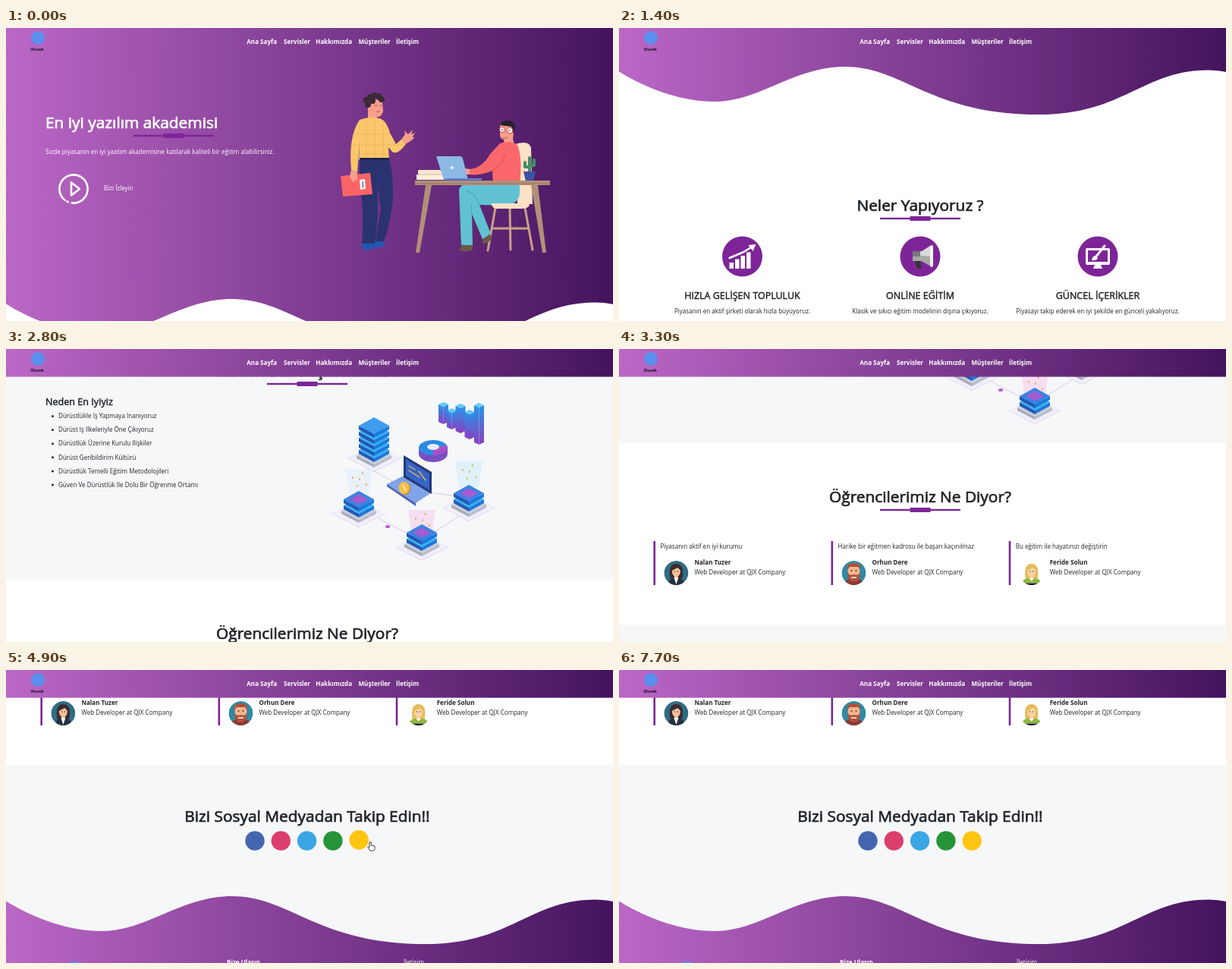
These frames come from a looping animation (800 by 386 pixels, 8.1 s). An HTML page:

```html
<!DOCTYPE html>
<html lang="tr">
<head>
<meta charset="utf-8">
<style>
  html, body { margin: 0; width: 100%; height: 100%; overflow: hidden; background: #fff; }
  svg { display: block; width: 100%; height: 100%; }
  text { font-family: "Open Sans", "Noto Sans", sans-serif; white-space: pre; }
  .medium { stroke: currentColor; stroke-width: .035em; }
</style>
</head>
<body>
<svg id="stage" viewBox="0 0 800 386"></svg>
<script>
const LOOP = 8100, STEP = 100;
const PURPLE = '#7d2598', INK = '#212529';
const WAVE = '0,363.5 C40,388 85,403 126,403 C185,403 230,357 298,357 ' +
  'C375,357 410,420 553,420 C665,420 690,361.5 776,361.5 Q790,361.5 800,364';

// Shape helpers; text is placed by its vertical centre
const text = (x, y, str, size = 8.07, fill = INK, weight = 400, anchor = 'start') =>
  `<text x="${x}" y="${y + size * .36}" font-size="${size}" fill="${fill}" color="${fill}" text-anchor="${anchor}" ` +
  (weight == 500 ? 'class="medium"' : `font-weight="${weight}"`) + `>${str}</text>`;
const middle = (x, y, str, size, weight = 400, fill = INK) => text(x, y, str, size, fill, weight, 'middle');
const rect = (x, y, w, h, fill, rx = 0) => `<rect x="${x}" y="${y}" width="${w}" height="${h}" fill="${fill}" rx="${rx}"/>`;
const disc = (x, y, r, fill, ry = r) => `<ellipse cx="${x}" cy="${y}" rx="${r}" ry="${ry}" fill="${fill}"/>`;
const shape = (d, fill) => `<path d="${d}" fill="${fill}"/>`;
const line = (d, color, width = 1) =>
  `<path d="${d}" fill="none" stroke="${color}" stroke-width="${width}" stroke-linecap="round" stroke-linejoin="round"/>`;
const at = (x, y, content) => `<g transform="translate(${x} ${y})">${content}</g>`;
const rule = (x, y) => rect(x - 53, y - 1.2, 106, 2.4, PURPLE) + rect(x - 13.5, y - 3, 27, 6, PURPLE);
const heading = (y, str) => middle(397, y, str, 20.85, 500);

const standingMan =
  shape('M469,283 l17,-2 l1,8 q-6,4 -18,3z M486,280 l10,-1 l4,6 q-4,5 -14,4z', '#2456b0') +
  shape('M466,172 H505 Q511,195 510,225 Q506,260 498,281 H487 L494,238 L489,203 Q492,250 486,284 H469 Q473,245 466,205z', '#2a3270') +
  shape('M477,98 Q488,91 496,98 L497,110 Q494,118 489,117 V123 H477z', '#f79f8a') +
  [[475, 95], [477, 101], [480, 91], [486, 89], [492, 90], [495, 94], [483, 96]].map(([x, y]) => disc(x, y, 4, '#3a2a35')).join('') +
  line('M486,102 h3 M493,102 h2 M488,110 q3,2 5,-1', '#a13f48', .8) +
  shape('M466,121 Q478,116 492,119 Q501,121 506,138 L514,153 L522,146 L527,153 Q516,168 509,163 L504,157 L505,174 H465 L466,151 L463,190 L455,187 Q451,143 466,121z', '#fbc76c') +
  line('M457,140 H506 M456,154 H524 M466,166 H505 M475,121 V173 M486,119 V173 M497,122 V173 M457,174 H464', '#e3ab50', .6) +
  rect(466, 171, 39, 3, '#1f2550') +
  shape('M521,147 L526,140 L525,135 L530,140 L536,134 L534,140 L539,138 L536,143 L538,145 L533,149 L526,153z', '#f79f8a') +
  shape('M441,195 L480,191 L483,219 L444,222z', '#fb6467') +
  shape('M466,200 l7,-1 l1,13 l-7,1z', '#fff') + line('M470,202 l.6,8', '#333', 1) +
  shape('M455,187 l8,3 l0,9 l-6,4 l-4,-7z', '#f79f8a');

const deskMan =
  shape('M671,153 Q690,147 692,158 L694,232 H674z', '#fae1c6') +
  line('M645,237 L635,293 M684,237 L694,292 M664,238 L665,292 M643,264 H688', '#c7a184', 3) +
  shape('M602,284 l13,1 l0,7 q-6,4 -18,1z M628,275 l9,-5 l4,6 q-5,8 -13,8z', '#6a5a48') +
  shape('M597,213 Q600,203 620,204 H676 Q682,230 660,234 L624,233 L639,271 L628,278 L614,245 L615,286 H600z', '#60c2d2') +
  line('M606,215 q14,1 17,18 M614,245 L613,232', '#3a9fb8', .8) +
  shape('M640,231 H689 Q692,237 680,238 H646 Q640,237 640,231z', '#fae1c6') +
  shape('M651,128 Q660,122 670,129 L668,146 L670,154 H657 L656,147 Q651,146 651,140z', '#f79f8a') +
  shape('M651,128 Q653,121 661,122 Q671,121 671,132 L668,139 L666,130z', '#272230') +
  `<g fill="#fbe3dd" stroke="#c92c42" stroke-width=".8"><circle cx="654" cy="134" r="3.7"/><circle cx="664" cy="135" r="4"/></g>` +
  disc(654, 134, .8, '#333') + disc(663, 135, .8, '#333') + line('M654,145 q4,2 7,-1', '#a13f48', .8) +
  shape('M651,152 Q664,147 674,154 Q681,170 677,207 H642 L641,188 Q625,195 611,193 L612,186 Q629,183 638,166z', '#fa686c') +
  line('M658,168 Q652,183 641,188', '#cf4757', .8) +
  shape('M612,186 L599,184 L594,188 L600,193 L611,193z', '#f79f8a') +
  rect(543, 187, 37, 6, '#f6e6d0', 1) + rect(541, 193, 40, 7, '#fbeeda', 1) + line('M543,193 H580', '#c9a992', .7) +
  shape('M567,169 H598 Q601,169 602,172 L609,200 H577z', '#8cb9e4') + disc(588, 184, 2, '#e9f4ff') +
  rect(578, 198, 49, 2.5, '#5d88cf', 1) +
  line('M690,190 V171 M690,183 h-6 v-6 M690,181 h6 v-7', '#3f8e63', 4) +
  shape('M682,189 H698 L695,202 H685z', '#3c50a4') +
  shape('M553,207 H561 L545,296 H540z M692,207 H701 L712,296 H707z', '#b28f78') +
  rect(539, 201, 178, 6, '#b28f78') + line('M540,205 H716', '#8e6e60', .7);

const hero =
  rect(0, 0, 800, 440, 'url(#violet)') +
  text(52, 124, 'En iyi yazılım akademisi', 20.85, '#fff', 500) + rule(221, 142) +
  text(52, 163, 'Sizde piyasanın en iyi yazılım akademisine katılarak kaliteli bir eğitim alabilirsiniz.', 8.07, '#fff') +
  `<circle cx="89" cy="212" r="18.6" fill="none" stroke="#fff" stroke-width="2.6" stroke-dasharray="108 3 4 2" transform="rotate(125 89 212)"/>` +
  line('M86,203.5 V220.5 L97,212z', '#fff', 2.6) +
  text(129, 211, 'Bizi İzleyin', 8.07, '#fff') +
  standingMan + deskMan +
  shape(`M${WAVE} V445 H0z`, '#fff');

const growth = [0, 1, 2, 3].map(i => rect(-17 + i * 7.5, 8 - i * 4.5, 5.5, 8 + i * 4.5, '#fff')).join('') +
  line('M-17,2 L2,-6 L13,-13', '#fff', 2.5) + shape('M8,-15 L18,-16 L14,-7z', '#fff');
const megaphone = shape('M-10,-7 H2 L13,-14 V12 L2,6 H-10z', '#d9d9d9') + shape('M-10,-1 H2 L13,0 V12 L2,6 H-10z', '#a8a8a8') +
  rect(-10, -7, 10, 7, '#777') + rect(13, -15, 4, 29, '#f4f4f4', 2) + shape('M-7,6 h7 l2,10 h-6z', '#333');
const monitor = rect(-16, -11, 32, 22, '#fff', 2) + rect(-13, -8, 26, 15, PURPLE) +
  shape('M-4,11 H4 L6,16 H-6z', '#fff') + line('M-3,1 L9,-14', '#fff', 3) + shape('M-8,5 Q-7,-1 -3,-1 L0,2 Q-2,6 -8,5z', '#fff');
const service = (x, icon, title, info) =>
  at(x, 607, disc(0, 0, 26.5, PURPLE) + icon) + middle(x, 658, title, 12.5, 500) + middle(x, 679, info, 8.07);

const services = heading(539, 'Neler Yapıyoruz ?') + rule(397, 557) +
  service(162.5, growth, 'HIZLA GELİŞEN TOPLULUK', 'Piyasanın en aktif şirketi olarak hızla büyüyoruz.') +
  service(397, megaphone, 'ONLİNE EĞİTİM', 'Klasik ve sıkıcı eğitim modelinin dışına çıkıyoruz.') +
  service(631, monitor, 'GÜNCEL İÇERİKLER', 'Piyasayı takip ederek en iyi şekilde en günceli yakalıyoruz.') +
  rect(358, 725, 77, 20, 'url(#pill)', 10) + middle(396.5, 735, 'Tüm Servisler', 8.07, 400, '#fff');

// Isometric slab: top diamond plus two side faces
const slab = (x, y, w, h, deep, top, left, right) =>
  shape(`M${x - w},${y} L${x},${y + h} v${deep} L${x - w},${y + deep}z`, left) +
  shape(`M${x + w},${y} L${x},${y + h} v${deep} L${x + w},${y + deep}z`, right) +
  shape(`M${x - w},${y} L${x},${y - h} L${x + w},${y} L${x},${y + h}z`, top);
const stack = (x, y, count, top) => slab(x, y + 10, 35, 18, 1, '#f2eef9', '#d9d4ea', '#d9d4ea') +
  slab(x, y + 7, 23, 12, 4, '#c9ced8', '#a7adba', '#b7bdc9') +
  Array.from({ length: count }, (_, i) =>
    slab(x, y - i * 8, 20, 11, 5, i == count - 1 ? top : '#35b4ef', '#2458b8', '#1f78dd')).join('');
const beam = (x, y, color) => shape(`M${x - 18},${y - 34} H${x + 18} L${x + 13},${y} H${x - 13}z`, color) +
  [[-9, -24], [4, -30], [9, -15], [-3, -13], [0, -22]].map(([dx, dy]) => rect(x + dx, y + dy, 1.6, 3, '#e7b64e')).join('');
const column = (x, top, bottom) => slab(x, top, 6.5, 3, bottom - top, '#63c9f7', 'url(#column)', 'url(#column)');
const platform = (x, y) => stack(x, y, 2, '#3b83e0') + slab(x, y - 8, 12, 6.5, 0, '#a45bd0', '#a45bd0', '#a45bd0');

const network =
  line('M450,323 L485,341 L530,365 L610,376 M485,341 L520,323 M465,386 L503,410 L548,432 L610,392 M430,395 L465,413', '#d9b9e8', .8) +
  stack(485, 313, 5, '#3f9df0') +
  [[576.5, 253, 276], [587.5, 261, 283], [599, 255, 288], [611, 263, 296], [623.5, 254, 303]].map(b => column(...b)).join('') +
  shape('M544,309 v9 a19,11 0 0 0 38,0 v-9z', '#7a4fc4') + disc(563, 310, 19, '#2a8be2', 10) +
  shape('M563,310 L581,307 A19,10 0 0 1 563,320z', '#a94fca') + disc(563, 309, 8, '#e9ecfb', 4) +
  shape('M502,358 L524,347 L561,369 L540,383z', '#7fa4e8') + shape('M502,358 L540,383 v4 L502,361z', '#4b62b4') +
  shape('M524,320 L561,342 V371 L524,349z', '#253878') + shape('M527,325 L558,344 V366 L527,347z', '#3564c4') +
  line('M531,334 l8,5 M531,340 l14,9 M544,341 l9,12', '#f0b45a', 1.3) +
  disc(526, 364, 7, '#d98a1d', 8) + disc(524.5, 363, 7, '#f8bf45', 8) + line('M523,359 l4,8', '#fff2c0', 1.5) +
  beam(610, 362, '#dff1fb') + platform(610, 378) + beam(465, 372, '#eaf1fd') + platform(465, 386) +
  beam(548, 426, '#f6def2') + platform(548, 430) + disc(503, 414, 3, '#b559d2', 2);

const reasons = ['Dürüstlükle Iş Yapmaya Inanıyoruz', 'Dürüst Iş Ilkeleriyle Öne Çıkıyoruz', 'Dürüstlük Üzerine Kurulu Ilişkiler',
  'Dürüst Geribildirim Kültürü', 'Dürüstlük Temelli Eğitim Metodolojileri', 'Güven Ve Dürüstlük Ile Dolu Bir Öğrenme Ortamı'];
const why = rect(0, 798, 800, 376, '#f6f7f9') + heading(898, 'Neden Bizi Seçmelisiniz ?') + rule(397, 916) +
  text(52, 939, 'Neden En Iyiyiz', 12.6, INK, 500) +
  reasons.map((str, i) => disc(61.5, 958.5 + i * 18.1, 1.5, INK) + text(69, 958.3 + i * 18.1, str)).join('') +
  at(0, 690, network);

const face = (skin, hair) => shape('M-8,7 Q-11,-12 0,-12 Q11,-12 8,7z', hair) + rect(-2.5, 2, 5, 7, skin) +
  disc(0, -2, 5.5, skin, 7) + shape('M-6,-3 Q-5,-11 0,-10 Q6,-11 6,-3 L2,-7z', hair) +
  disc(-2, -2, .7, '#333') + disc(2, -2, .7, '#333');
const avatars = [
  disc(0, 0, 16, '#2f6c84') + face('#f4c09a', '#3c2a2c') + shape('M-11,16 Q-10,7 -3,6 L0,11 L3,6 Q10,7 11,16z', '#26313e') + shape('M-3,6 L0,15 L3,6z', '#fff'),
  disc(0, 0, 16, '#2f8aa5') + shape('M-13,16 Q-12,7 0,7 Q12,7 13,16z', '#8c3a34') + disc(0, -2, 8, '#f5b48c', 9) +
    shape('M-9,-4 Q-10,-13 0,-13 Q10,-13 9,-4 L6,-8 H-6z M-8,0 Q-6,4 0,2 Q6,4 8,0 Q9,11 0,12 Q-9,11 -8,0z', '#b2503a') +
    disc(-3, -3, .9, '#333') + disc(3, -3, .9, '#333') + line('M-3,6 H3', '#fff', 1.5),
  shape('M-12,13 Q-11,6 0,6 Q11,6 12,13z', '#8db83a') + face('#fbd2a8', '#e5bd5b') + shape('M-3,7 L0,11 L3,7z', '#fff') + rect(-16, 13.5, 32, 3, '#111'),
];
const review = (x, quote, name, i) => rect(x, 1303, 2.6, 58, PURPLE) + text(x + 9, 1310, quote) +
  at(x + 30, 1345, `<g clip-path="url(#round)">${avatars[i]}</g>`) +
  text(x + 54, 1331, name, 8.07, INK, 700) + text(x + 54, 1344, 'Web Developer at QJX Company');
const reviews = heading(1244, 'Öğrencilerimiz Ne Diyor?') + rule(397, 1262) +
  review(45.4, 'Piyasanın aktif en iyi kurumu', 'Nalan Tuzer', 0) +
  review(279.5, 'Harike bir eğitmen kadrosu ile başarı kaçınılmaz', 'Orhun Dere', 1) +
  review(513.7, 'Bu eğitim ile hayatınızı değiştirin', 'Feride Solun', 2);

const badgeX = i => 328 + i * 34.3;
const social = rect(0, 1413.5, 800, 300, '#f6f7f9') + heading(1480, 'Bizi Sosyal Medyadan Takip Edin!!') +
  ['#4466b0', '#dc3f6c', '#3ba6e4', '#259338', '#fdc50f'].map((color, i) =>
    `<g class="badge">${disc(badgeX(i), 1513, 12.7, color)}</g>`).join('') +
  at(0, 1229, shape(`M${WAVE} V480 H0z`, 'url(#violet)')) +
  disc(90, 1688, 16, '#5b8fee') + text(291, 1673, 'Bize Ulaşın', 8.07, '#fff', 700) + text(524, 1673, 'İletişim', 8.07, '#fff');

const header = rect(0, 0, 800, 36.6, 'url(#violet)') + disc(42, 13, 9, '#5b8fee') + middle(41, 28, 'Oluvek', 5, 700, '#1b1026') +
  [[317.3, 'Ana Sayfa'], [366, 'Servisler'], [408.3, 'Hakkımızda'], [464.5, 'Müşteriler'], [514, 'İletişim']]
    .map(([x, str]) => text(x, 18, str, 8.07, '#fff', 700)).join('');

const outline = d => `<path d="${d}" fill="#fff" stroke="#111" stroke-width=".8" stroke-linejoin="round"/>`;
const arrow = outline('M0,0 V10.5 L2.5,8.2 L4.2,12 L6,11.2 L4.3,7.6 H7.5z');
const hand = outline('M-1,0 Q.2,-1 1.2,0 V4 L6,5 V8 Q6,10 4.5,11 H0 L-3.5,6.5 Q-3,5 -1,7z');

const stops = '<stop stop-color="#bb67c6"/><stop offset="1" stop-color="#45135e"/>';
const stage = document.getElementById('stage');
stage.innerHTML = `<defs>
  <linearGradient id="violet" gradientUnits="userSpaceOnUse" x2="800">${stops}</linearGradient>
  <linearGradient id="pill">${stops}</linearGradient>
  <linearGradient id="column" x2="0" y2="1"><stop stop-color="#2596ea"/><stop offset="1" stop-color="#8a3fc0"/></linearGradient>
  <clipPath id="round"><circle r="16"/></clipPath></defs>
  <g id="page">${hero + services + why + reviews + social}</g>${header}
  <g id="cursor"><g id="arrow">${arrow}</g><g id="hand">${hand}</g></g>`;

const [page, cursor, arrowIcon, handIcon] = ['page', 'cursor', 'arrow', 'hand'].map(id => document.getElementById(id));
const badges = stage.querySelectorAll('.badge');

// Keys are [time, ...values]
const scrollKeys = [[0, 0], [700, 165], [1400, 306], [2300, 690], [3300, 1050], [4500, 1288]];
const cursorKeys = [[4700, 515, 300], [4900, 480, 227], [5500, 322, 224], [6100, 520, 20], [6400, 684, 150], [6700, 696, 158]];
function sample(keys, t) {
  const next = keys.findIndex(key => key[0] > t);
  if (next < 1) return (next ? keys[keys.length - 1] : keys[0]).slice(1);
  const a = keys[next - 1], b = keys[next], k = (t - a[0]) / (b[0] - a[0]);
  return a.slice(1).map((v, i) => v + (b[i + 1] - v) * k);
}

function draw(now) {
  const t = Math.floor(now % LOOP / STEP) * STEP;
  page.setAttribute('transform', `translate(0 ${-Math.round(sample(scrollKeys, t)[0])})`);
  const [x, y] = sample(cursorKeys, t);
  const shown = t >= 4700 && t < 6800;
  let hovering = false;
  badges.forEach((badge, i) => {
    const over = shown && Math.hypot(x - badgeX(i), y - 225) < 16;
    badge.setAttribute('transform', `translate(0 ${over ? -1.2 : 0})`);
    hovering ||= over;
  });
  cursor.setAttribute('transform', `translate(${x} ${y})`);
  cursor.style.display = shown ? '' : 'none';
  arrowIcon.style.display = hovering ? 'none' : '';
  handIcon.style.display = hovering ? '' : 'none';
}

const start = performance.now();
function tick() {
  draw(performance.now() - start);
  requestAnimationFrame(tick);
}
tick();
</script>
</body>
</html>
```
